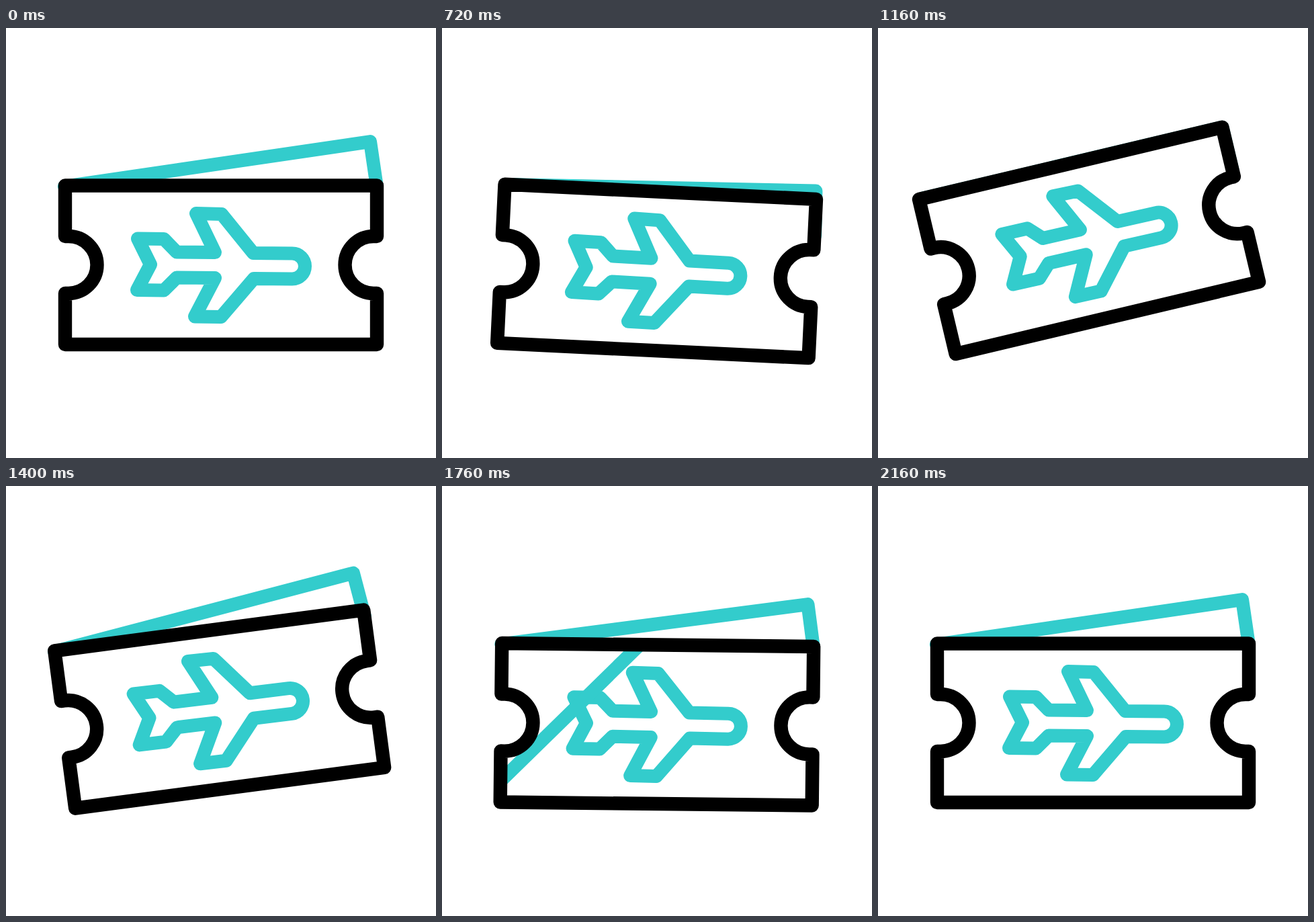
Recreate the animation shown at these times as an HTML page. Size 640 by 640 pixels, loop 2.56 s.

```html
<!DOCTYPE html>
<html lang="en">
<head>
<meta charset="utf-8">
<title>Flight tickets</title>
<style>
  html, body { margin: 0; width: 100%; height: 100%; overflow: hidden; background: #fff; }
  svg { display: block; width: 100vw; height: 100vh; }
  .line { fill: none; stroke: #33cccc; stroke-width: 20; stroke-linecap: round; stroke-linejoin: round; }
  .edge { stroke: #000; stroke-width: 20.4; }
</style>
</head>
<body>
<svg viewBox="0 0 640 640">
  <defs>
    <path id="shape" d="M88 234.5H552V310H547A42.5 42.5 0 0 0 547 395H552V471H88V395H93A42.5 42.5 0 0 0 93 310H88Z"/>
    <clipPath id="inside"><use href="#shape"/></clipPath>
  </defs>
  <g id="tickets">
    <path id="back" class="line" d="M92 234.5H552V301"/>
    <use href="#shape" fill="#fff"/>
    <path class="line" d="M196 313.5L235 314L254 333.5L311 334L283 276L321 277L368 335L426 335.5A19 19 0 0 1 426 373.5L369 373L320 430L281 429.5L311 372L254 371.5L235 390.5L195 390L215 352Z"/>
    <g clip-path="url(#inside)"><path id="shine" class="line" d="M600 -600L-600 600"/></g>
    <use href="#shape" class="line edge"/>
  </g>
</svg>
<script>
const LOOP = 2560, STEP = 40;

// Each track is a list of [time in ms, value], eased in and out between entries.
const swing = [[450, 0], [920, 4.5], [1212, -15], [1613, 1.5], [1873, 0]];
const fan = [[90, -8.35], [960, 0], [1180, 0], [1430, -7.5], [1613, -7.5], [1873, -8.35]];
const sweep = [[1500, 260], [2160, 1040]];

function at(track, t) {
  if (t <= track[0][0]) return track[0][1];
  for (let i = 1; i < track.length; i++) {
    const [t0, a] = track[i - 1], [t1, b] = track[i];
    if (t < t1) {
      const u = (t - t0) / (t1 - t0);
      return a + (b - a) * u * u * (3 - 2 * u);
    }
  }
  return track[track.length - 1][1];
}

const byId = id => document.getElementById(id);
const tickets = byId("tickets"), back = byId("back"), shine = byId("shine");

function draw(t) {
  const angle = at(swing, t);
  // The upward swing turns about a lower point than the downward one.
  const pivot = angle < 0 ? "162 360" : "129 348";
  tickets.setAttribute("transform", `rotate(${angle} ${pivot})`);
  back.setAttribute("transform", `rotate(${at(fan, t)} 99 270)`);
  const half = at(sweep, t) / 2;
  shine.setAttribute("transform", `translate(${half} ${half})`);
  shine.style.display = t > sweep[0][0] && t < sweep[1][0] ? "" : "none";
}

const start = performance.now();
function tick() {
  const t = (performance.now() - start) % LOOP;
  draw(Math.floor(t / STEP) * STEP);
  requestAnimationFrame(tick);
}
tick();
</script>
</body>
</html>
```
